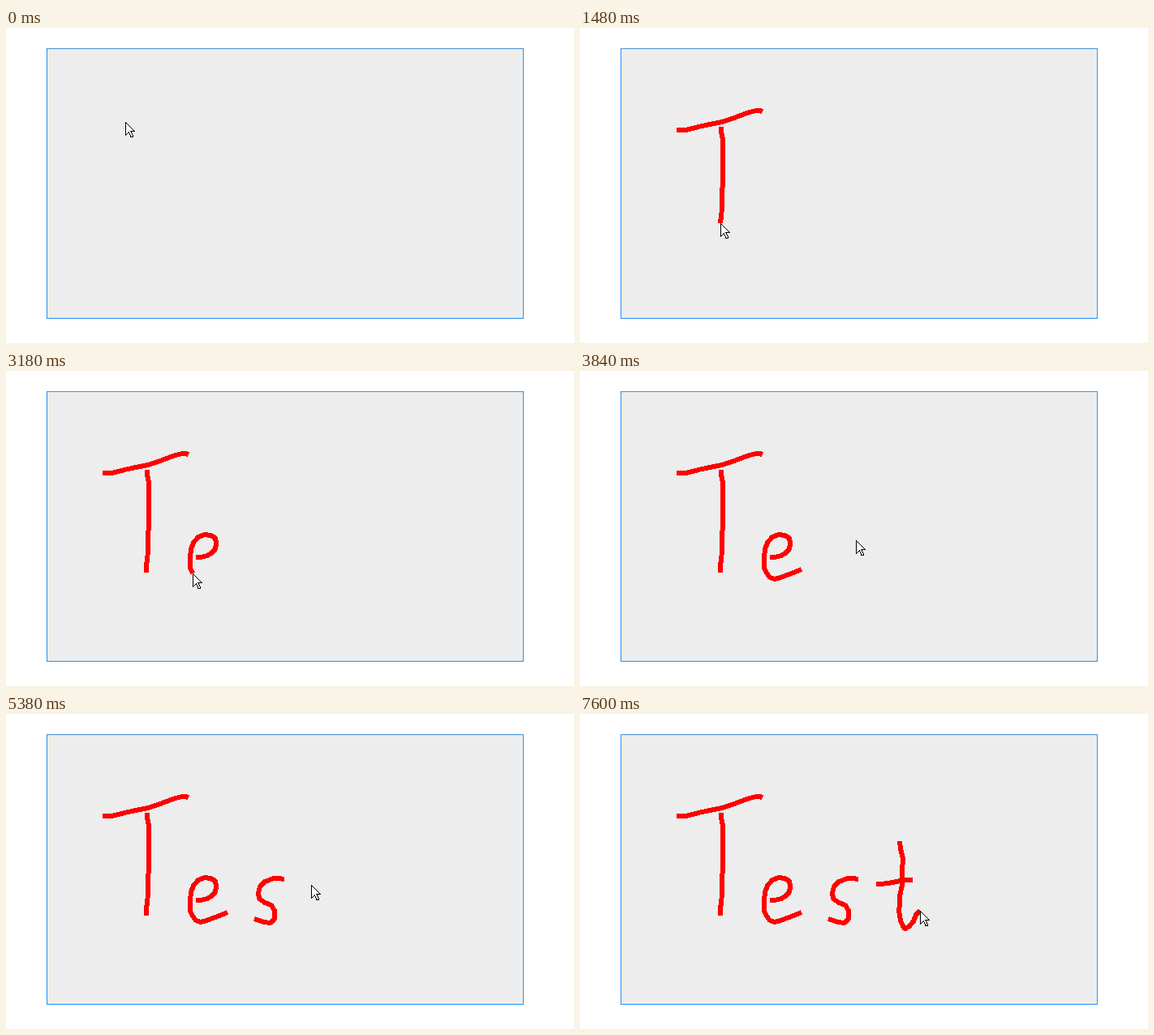
An HTML page for the animation above (7830 ms loop, 700 px wide and 389 px high).

```html
<!DOCTYPE html>
<html lang="en">
<head>
<meta charset="utf-8">
<title>Handwriting</title>
<style>
  html, body { margin: 0; width: 100%; height: 100%; overflow: hidden; background: #fff; }
  svg { display: block; }
  #ink path { fill: none; stroke: none; stroke-width: 6; stroke-linejoin: bevel; }
  #ink .pen { stroke: #f00; }
</style>
</head>
<body>
<svg width="700" height="389" viewBox="0 0 700 389" shape-rendering="crispEdges">
  <rect x="50" y="25" width="588" height="334" fill="#ededed"/>
  <path d="M50 25.5H637.5V359" fill="none" stroke="#4391d6"/>
  <path d="M50.5 25V358.5H638" fill="none" stroke="#1e90ff"/>
  <g id="ink"></g>
  <path id="cursor" d="M.5.5V16.5L4.5 12.5L7 18.5H9L9.5 17.5L7 11.5H11.5Z" fill="#fff" stroke="#000"/>
</svg>
<script>
const LOOP = 7830;
const ink = document.getElementById('ink');
const cursor = document.getElementById('cursor');
const phases = [];

// The mouse follows the path d in equal steps, the first at start and the last at end.
function add(start, end, steps, d, pen) {
  const path = document.createElementNS('http://www.w3.org/2000/svg', 'path');
  path.setAttribute('d', d);
  if (pen) path.setAttribute('class', 'pen');
  ink.append(path);
  phases.push({ start, end, steps, path, length: path.getTotalLength() });
}
const move = (start, end, steps, d) => add(start, end, steps, d, false);
const draw = (start, end, steps, d) => add(start, end, steps, d, true);

// T
move(60, 360, 5, 'M147 116L119 126');
draw(590, 880, 5, 'M119 126L131 126L148 121.5L175 116L190 111L207 104.5L215 102.5L222 102L225 103.5');
move(950, 950, 1, 'M224 103L204 121');
move(1180, 1180, 1, 'M204 121L174 122');
draw(1250, 1480, 4, 'M174 122L174 128L176 138L176 190L175 205L174.5 228L173 241');
draw(1550, 1690, 3, 'M173.2 240L173 249');

// e
move(1760, 1760, 1, 'M173 249L204 233');
move(1920, 2060, 3, 'M204 233L236 228');
move(2220, 2280, 2, 'M236 228L234 230');
draw(2440, 2580, 3, 'M234 230L242 229.5L248 228L253 225');
draw(2660, 3180, 8, 'M252 226L258 220L259 213L258 206L252 203L245 202L237 205L231 212L228 220L227 230L227 243L230 250');
draw(3240, 3400, 3, 'M229 248L234 255L240 257L247 255L258 251L268 247L273 245');

// s
move(3540, 3680, 3, 'M272 246L340 213');
move(3840, 3900, 2, 'M340 213L340 210L341 206');
draw(4060, 4780, 11, 'M343 204L336 203L330 203L319 207L313 213L311 221L312 228L319 233L327 236L331 243L331 252L329 256');
draw(4860, 5080, 4, 'M330 254L326 258L318 257L312 255L306 253');

// t
move(5160, 5310, 3, 'M306 253L385 214');
move(5380, 5380, 1, 'M385 214L376 211');
move(5460, 5600, 3, 'M376 211L366 210');
draw(5680, 5900, 4, 'M365 210.5L380 209L395 206L410 204.5');
move(5970, 6040, 2, 'M410 205L394 157');
draw(6200, 6340, 3, 'M394 157L395 167L398 178L397 195L397 213');
draw(6420, 6920, 8, 'M397 211L394 225L394 235L393 243L395 255L399 264');
draw(7000, 7000, 1, 'M398 262L400 265');
draw(7140, 7600, 7, 'M399 264L401 265L406 262L411 256L414 248L419 243');

function render(t) {
  let x = 147, y = 116;
  for (const { start, end, steps, path, length } of phases) {
    const started = t >= start;
    path.style.visibility = started ? 'visible' : 'hidden';
    if (!started) continue;
    const progress = end > start ? Math.min(1, (t - start) / (end - start)) : 1;
    const step = Math.floor(progress * (steps - 1) + 0.12) + 1;
    const reach = length * step / steps;
    path.style.strokeDasharray = step < steps ? `${reach} ${length}` : 'none';
    ({ x, y } = path.getPointAtLength(reach));
  }
  cursor.setAttribute('transform', `translate(${Math.round(x)} ${Math.round(y)})`);
}

const origin = performance.now();
function tick() {
  render((performance.now() - origin) % LOOP);
  requestAnimationFrame(tick);
}
tick();
</script>
</body>
</html>
```
